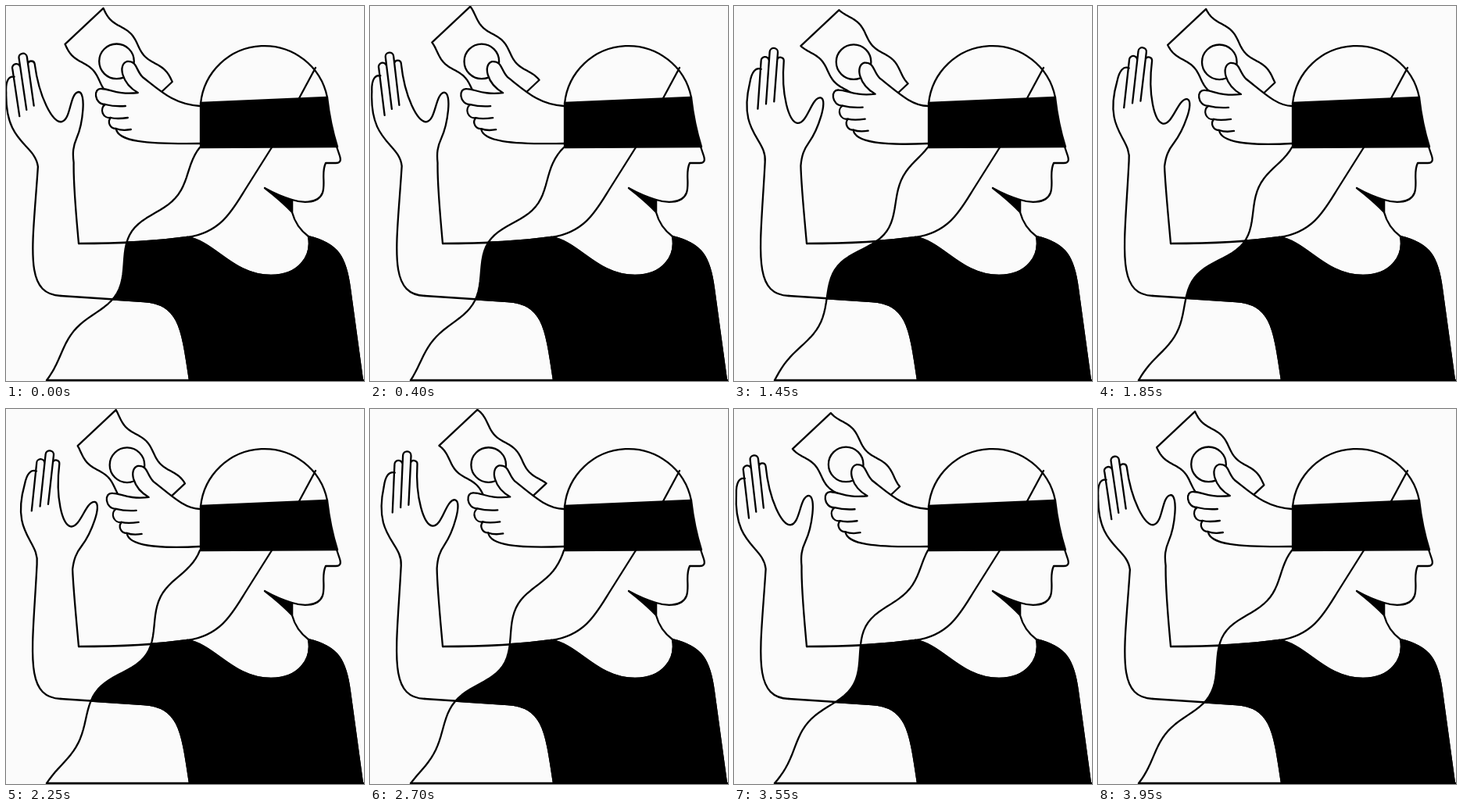
An HTML page with a canvas that plays this animation: 458x480 px, repeating every 4000 ms.

```html
<!DOCTYPE html>
<html lang="en">
<head>
<meta charset="utf-8">
<title>Blindfolded</title>
<style>
html, body { margin: 0; width: 100%; height: 100%; overflow: hidden; background: #fbfbfb; }
canvas { display: block; }
</style>
</head>
<body>
<canvas id="stage" width="458" height="480"></canvas>
<script>
const ctx = document.getElementById('stage').getContext('2d');
const PAPER = '#fbfbfb', INK = '#000', LOOP = 4000, STEP = 50, TAU = Math.PI * 2;

const shirt = new Path2D(`M93,304 C150,304 190,302 232,296
  C268,302 290,345 339,345 C375,345 392,320 387,295
  C425,304 435,322 440,362 L456,479 H235
  C225,412 222,381 176,378 L70,371`);
const blindfold = new Path2D('M249,124 L411,117 Q415,152 424,180 L249,181 Z');
const jawShadow = new Path2D('M331,233 Q349,243 366,248 V264 Q353,250 331,233');
const outlines = new Path2D(`M249,125 A82,82 0 0 1 411,117
  M396,79 L375,118 M340,181 L306,235 C290,261 275,290 232,296
  M423,180 L427,192 Q430,201 422,201 H409 C403,213 409,227 405,239
  C399,255 375,251 366,248 V264 Q371,283 387,295
  M52,479 H458`);

// Raised hand, upright
const raisedHand = new Path2D(`M40,202 C40,172 2,168 12,103 C13,88 18,82 25,84
  M25,135 L24,74 a5,5 0 0 1 10,-2 M35,128 L34,61 a5.2,5.2 0 0 1 10.4,0 L45,124
  M44.4,70 a4.4,4.4 0 0 1 8.6,1
  C53,115 66,148 77,149 C90,149 92,114 104,114 C114,116 104,155 94,172 C88,182 86,190 86,203`);

function paint(path) {
  ctx.fillStyle = PAPER;
  ctx.fill(path);
  ctx.stroke(path);
}

function ink(path) {
  ctx.fillStyle = INK;
  ctx.fill(path);
  ctx.stroke(path);
}

// Points along a line from (x, y) in direction (ux, uy), pushed sideways by offset(s)
function ripple(x, y, ux, uy, len, offset) {
  return Array.from({ length: 61 }, (_, i) => {
    const s = len * i / 60, d = offset(s);
    return [x + ux * s + uy * d, y + uy * s - ux * d];
  });
}

function polyline(points, closed) {
  const path = new Path2D();
  points.forEach(p => path.lineTo(...p));
  if (closed) path.closePath();
  return path;
}

// Back hair: a travelling wave pinned at both ends
function hairLine(phase) {
  const len = 357;
  return ripple(248, 181, -0.549, 0.835, len, s =>
    Math.sin(Math.PI * (s / len) ** 0.85) * (15 * Math.cos(TAU * (s - 55) / 165 - phase) + 1));
}

function drawArm(swing) {
  const turn = new DOMMatrix().translate(68, 197).rotate(-7.5 * swing).translate(-68, -197);
  const left = turn.transformPoint({ x: 40, y: 202 });
  const right = turn.transformPoint({ x: 86, y: 203 });
  const arm = new Path2D(`M70,371 C22,369 34,310 ${left.x},${left.y}
    M93,304 C90,270 86,230 ${right.x},${right.y}`);
  arm.addPath(raisedHand, turn);
  ctx.stroke(arm);
}

function drawNote(swing, phase) {
  const edge = (x, y) => ripple(x - 7.5 * swing, y, 0.684, 0.73, 129,
    s => 3.4 * Math.sin(2 * phase - TAU * s / 64.5));
  paint(polyline([...edge(132, 2.8), ...edge(83, 48.8).reverse()], true));
  ctx.beginPath();
  ctx.arc(148.5 - 7 * swing, 71.3 - 0.5 * swing, 22.3, 0, TAU);
  ctx.stroke();
}

// The fingers drift while the wrist stays at the blindfold
function drawGrip(swing) {
  const dx = -7.2 * swing, dy = -swing, wrist = 248 - dx;
  ctx.save();
  ctx.translate(dx, dy);
  paint(new Path2D(`M${wrist},${128 - dy} C222,127 205,110 182,92
    C173,83 175,71 162,72 C150,76 155,100 176,112
    C150,115 140,107 130,107 C118,105 120,127 134,127
    A9.5,9.5 0 0 0 141,144 A8.6,8.6 0 0 0 148,158 C150,174 185,178 ${wrist},${176 - dy}`));
  ctx.stroke(new Path2D('M134,127 q12,3 26,2 M141,144 q8,2 22,0 M148,158 q8,3 19,1'));
  ctx.restore();
}

function drawFigure(phase) {
  const hair = hairLine(phase);
  ctx.save();
  ctx.clip(polyline([...hair, [458, 480], [458, 181]], true));
  ink(shirt);
  ctx.restore();
  ctx.stroke(shirt);
  ctx.stroke(polyline(hair));
  ink(blindfold);
  ink(jawShadow);
  ctx.stroke(outlines);
}

function draw() {
  const t = Math.floor((performance.now() - start) % LOOP / STEP) * STEP;
  const phase = TAU * t / LOOP, swing = Math.cos(phase);
  ctx.fillStyle = PAPER;
  ctx.fillRect(0, 0, 458, 480);
  drawNote(swing, phase);
  drawGrip(swing);
  drawArm(swing);
  drawFigure(phase);
  requestAnimationFrame(draw);
}

ctx.strokeStyle = INK;
ctx.lineWidth = 2.3;
ctx.lineCap = ctx.lineJoin = 'round';
const start = performance.now();
draw();
</script>
</body>
</html>
```
